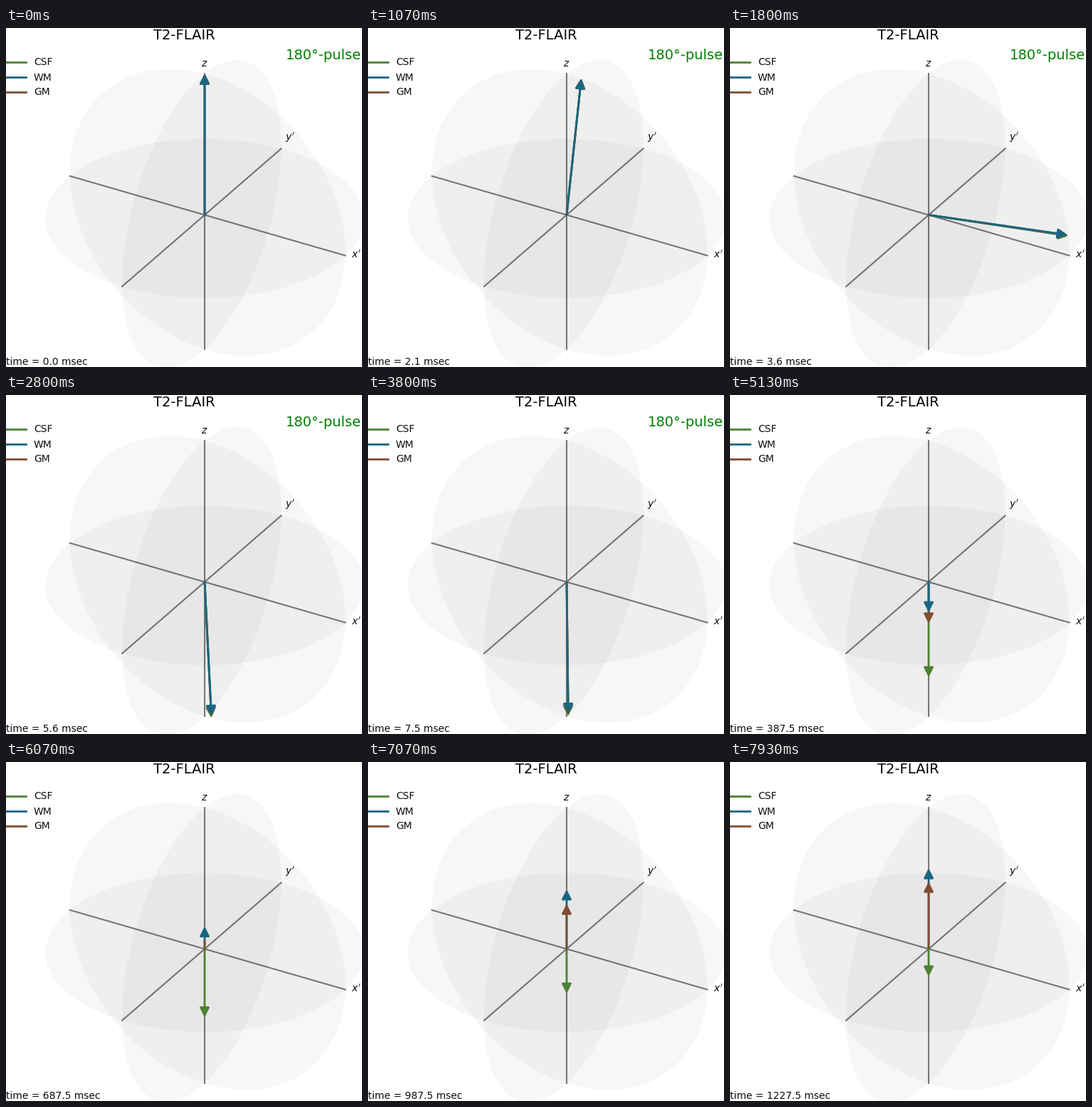
These frames come from a looping animation (500x476 px, 8000 ms). A matplotlib script:

```python
import math

import numpy as np
import matplotlib.pyplot as plt
from matplotlib.animation import FuncAnimation
from matplotlib.patches import FancyArrowPatch, Polygon

W, H, DPI = 500, 476, 100
FRAMES, LOOP_MS = 120, 8000

# Camera: elevation 30, azimuth -60, mild perspective
CENTER = np.array([279.0, 262.5])
SCALE, PERSPECTIVE = 223.3, 0.05
ELEV, AZIM = math.radians(30), math.radians(-60)

# Time axis: slow motion through the pulse, then fast recovery
PULSE_FRAMES, PULSE_MS = 57, 7.5
SLOW_STEP, FAST_STEP = 2 / 15, 20.0
FADE_FRAMES = 15

# Pulse shape: Gaussian, integrated in small steps
FLIP, PEAK_MS, SIGMA_MS = math.radians(179.4), 3.69, 0.85
DT = 0.01

TISSUES = ["CSF", "WM", "GM"]
COLORS = [(0.3, 0.5, 0.2), (0.1, 0.4, 0.5), (0.5, 0.3, 0.2)]
T1 = np.array([2400.0, 790.0, 910.0])
T2 = np.array([1400.0, 80.0, 100.0])
HEAD_MIN = 0.075
INK = (0.05, 0.05, 0.05)

plt.rcParams["font.family"] = "DejaVu Sans"


def project(x, y, z):
    """Map a 3D point (or arrays) to stage pixels."""
    ca, sa = math.cos(AZIM), math.sin(AZIM)
    ce, se = math.cos(ELEV), math.sin(ELEV)
    right = -sa * x + ca * y
    up = -se * (ca * x + sa * y) + ce * z
    depth = ce * (ca * x + sa * y) + se * z
    f = SCALE / (1 - PERSPECTIVE * depth)
    return CENTER[0] + right * f, CENTER[1] - up * f


def flip_angle(t):
    return FLIP * 0.5 * (1 + math.erf((t - PEAK_MS) / (SIGMA_MS * math.sqrt(2))))


def simulate_pulse():
    """Bloch rotation about y with relaxation; returns (x, z) per step."""
    x, z = np.zeros(3), np.ones(3)
    e1, e2 = np.exp(-DT / T1), np.exp(-DT / T2)
    states = [(x, z)]
    for i in range(round(PULSE_MS / DT)):
        turn = flip_angle((i + 1) * DT) - flip_angle(i * DT)
        c, s = math.cos(turn), math.sin(turn)
        x, z = x * c + z * s, z * c - x * s
        x, z = x * e2, 1 + (z - 1) * e1
        states.append((x, z))
    return states


STATES = simulate_pulse()


def frame_time(k):
    if k < PULSE_FRAMES:
        return k * SLOW_STEP
    return PULSE_MS + FAST_STEP * (k - PULSE_FRAMES)


def magnetization(t):
    if t <= PULSE_MS:
        return STATES[round(t / DT)]
    z_end = STATES[-1][1]
    return np.zeros(3), 1 + (z_end - 1) * np.exp(-(t - PULSE_MS) / T1)


fig = plt.figure(figsize=(W / DPI, H / DPI), dpi=DPI, facecolor="white")
ax = fig.add_axes([0, 0, 1, 1])
ax.set_xlim(0, W)
ax.set_ylim(H, 0)
ax.axis("off")


def label(x, y, text, size=10, color=INK, ha="left"):
    return ax.text(x, y, text, fontsize=size, color=color, ha=ha, va="baseline", zorder=20)


# Axes and the three unit discs laid over them
for axis in np.eye(3):
    (x0, y0), (x1, y1) = project(*-axis), project(*axis)
    ax.plot([x0, x1], [y0, y1], color="0.5", lw=1.5, zorder=1)

phi = np.linspace(0, 2 * np.pi, 200, endpoint=False)
cos, sin, zero = np.cos(phi), np.sin(phi), np.zeros_like(phi)
for ring in [(cos, sin, zero), (cos, zero, sin), (zero, cos, sin)]:
    ax.add_patch(Polygon(np.column_stack(project(*ring)), closed=True,
                         facecolor=(0, 0, 0, 0.03), edgecolor="none", lw=0, zorder=2))

label(279, 53.5, "$z$", ha="center")
label(491.5, 323, "$x'$", ha="center")
label(399, 158, "$y'$", ha="center")
label(250, 15.5, "T2-FLAIR", size=14, color="black", ha="center")

for i, (name, color) in enumerate(zip(TISSUES, COLORS)):
    y = 47.5 + 21 * i
    ax.plot([0, 27.8], [y, y], color=color, lw=2, solid_capstyle="projecting", zorder=20)
    label(39, y + 5, name)

pulse_text = label(393, 44, "180°-pulse", size=14, color=(0, 0.5, 0))
time_text = label(0, 473, "")

arrows = []
for color in COLORS:
    arrow = FancyArrowPatch(CENTER, project(0, 0, 1), arrowstyle="-|>", mutation_scale=20,
                            shrinkA=0, shrinkB=0, lw=2, color=color)
    arrows.append(ax.add_patch(arrow))
# Shorter vectors lie on top; ties keep this order
STACK = [0, 2, 1]


def update(k):
    t = frame_time(k)
    mx, mz = magnetization(t)
    length = np.hypot(mx, mz)
    order = sorted(STACK, key=lambda i: -length[i])
    for i, arrow in enumerate(arrows):
        arrow.set_positions(tuple(CENTER), project(mx[i], 0, mz[i]))
        arrow.set_arrowstyle("-|>" if length[i] > HEAD_MIN else "-")
        arrow.set_zorder(5 + order.index(i))
    pulse_text.set_alpha(min(1.0, max(0.0, 1 - (k - PULSE_FRAMES) / FADE_FRAMES)))
    time_text.set_text(f"time = {t:.1f} msec")
    return [*arrows, pulse_text, time_text]


anim = FuncAnimation(fig, update, frames=FRAMES, interval=LOOP_MS / FRAMES,
                     repeat=True, repeat_delay=0, blit=False)
plt.show()
```
